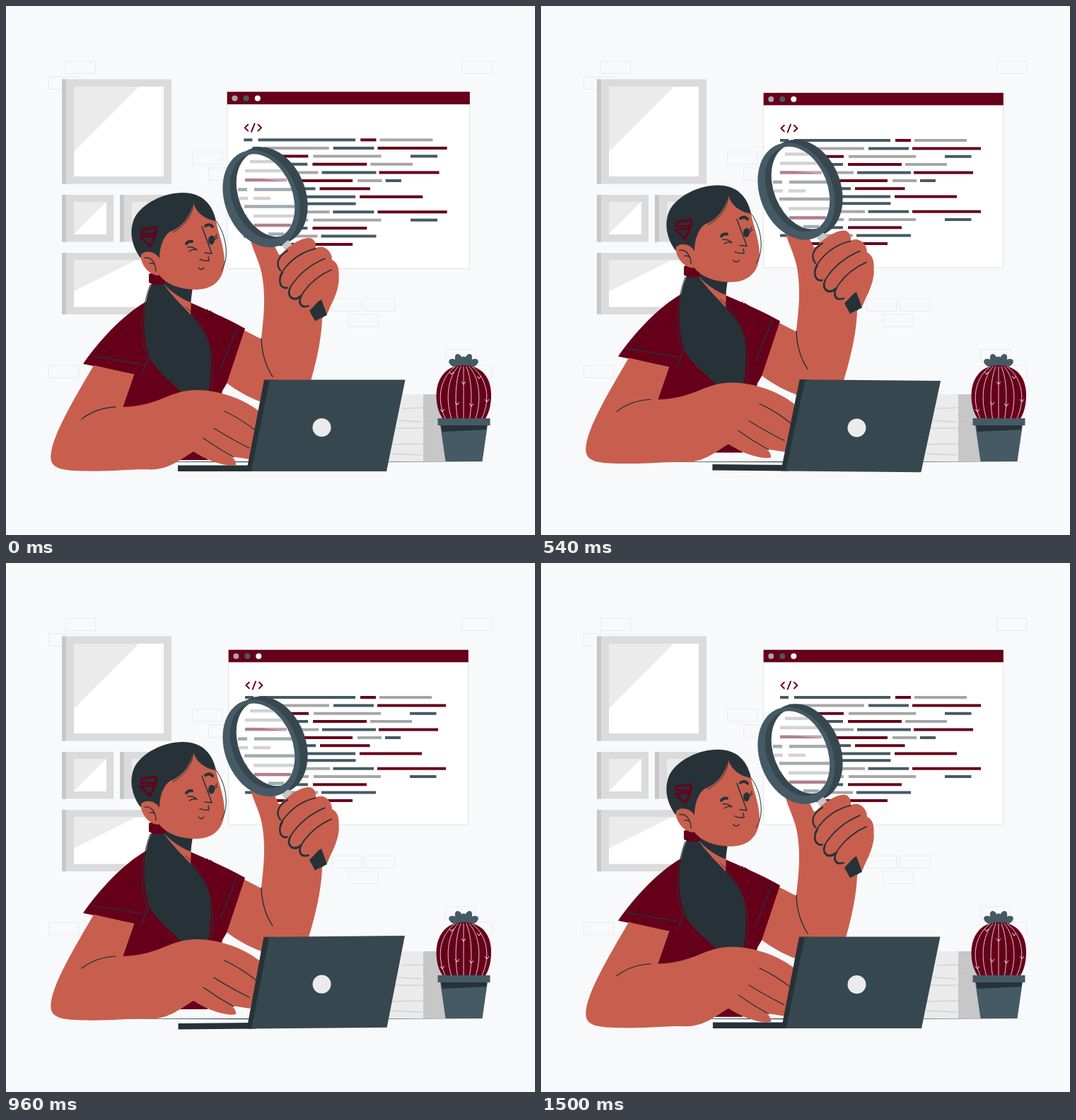
Write an HTML page with a canvas that moves like this. It is 748 by 748 pixels and loops after 1540 ms.

```html
<!DOCTYPE html>
<html lang="en">
<head>
<meta charset="utf-8">
<title>Code review</title>
<style>
html, body { margin: 0; width: 100%; height: 100%; overflow: hidden; background: #f8f9fb; }
canvas { display: block; width: 748px; height: 748px; }
</style>
</head>
<body>
<canvas id="stage" width="748" height="748"></canvas>
<script>
const ctx = document.getElementById('stage').getContext('2d');
const LOOP = 1540, FRAME = 1000 / 24, FRAMES = 37;
const BG = '#f8f9fb', INK = '#263238', SLATE = '#37474f', STEEL = '#455a64', MAROON = '#66001a',
      SKIN = '#c85f4e', GREY = '#a6a6a6', PALE = '#ebebeb', FRAMEGREY = '#dbdbdb', SHADE = '#c7c7c7';
const CODE = { d: STEEL, m: MAROON, g: GREY };

function fill(d, color) {
  ctx.fillStyle = color;
  ctx.fill(new Path2D(d));
}
function line(d, width = 1.4, color = INK) {
  ctx.strokeStyle = color;
  ctx.lineWidth = width;
  ctx.stroke(new Path2D(d));
}
function box(x1, y1, x2, y2, color) {
  ctx.fillStyle = color;
  ctx.fillRect(x1, y1, x2 - x1, y2 - y1);
}
function oval(x, y, rx, ry, color, angle = 0) {
  ctx.fillStyle = color;
  ctx.fill(ovalPath(x, y, rx, ry, angle));
}
function ovalPath(x, y, rx, ry, angle) {
  const p = new Path2D();
  p.ellipse(x, y, rx, ry, angle, 0, 7);
  return p;
}
function group(draw) {
  ctx.save();
  draw();
  ctx.restore();
}

// Straight-line interpolation through [time, value] pairs.
function track(keys, t) {
  const i = keys.findIndex(k => k[0] > t);
  const [t0, v0] = keys[i - 1], [t1, v1] = keys[i];
  return v0 + (v1 - v0) * (t - t0) / (t1 - t0);
}
const PULSE = [[0, 1.012], [133, 1.0985], [484, 1], [620, 1], [774, 1.1], [930, 1], [1600, 1]];
const FLOAT = [[0, 0], [760, -14.8], [1510, 0], [1600, 0]];
const TILT = [[0, 0], [380, 1], [1140, -1], [1510, 0], [1600, 0]];

function picture(x, y, x2, y2, glassW, glassH, right) {
  box(x, y, x2, y2, FRAMEGREY);
  box(x, y, x + 6, y2, SHADE);
  box(x + 17, y + 10.5, right, y2 - 10.5, '#fff');
  fill(`M${x + 17},${y + 10.5}h${glassW}l${-glassW},${glassH}z`, PALE);
}

function wall() {
  const bricks = [[84.5, 78], [61, 100], [645, 78], [264, 206.5], [287, 229], [461, 414],
                  [508, 414], [484.5, 436], [622, 486], [645, 508], [61, 508]];
  bricks.forEach(([x, y]) => line(`M${x},${y}h42v17.5h-42z`, 1, '#e9eaeb'));
  picture(79, 103.5, 234, 251.5, 92, 92, 223);
  picture(79, 267, 152, 333.5, 45, 45, 142);
  picture(161, 267, 234, 333.5, 45, 45, 224);
  picture(79, 349, 234, 436, 88, 44, 224);
}

const ROWS = [
  [190, 'd338-350 d358-494 m501-523 g528-602'],
  [201.5, 'd350-361 g366-457 d463-520 m525-622'],
  [212.8, 'm360-428 g435-530 d571-608.5'],
  [224, 'd360-427 m434-510 g515-574'],
  [235.6, 'g360-442 d447-523 m527-611'],
  [247, 'm350-490 g497-531 d536-558'],
  [258.2, 'd360-438 m444-514.5'],
  [269.5, 'd360-494 m500-588'],
  [279.2, 'd360-494.5'],
  [290.7, 'g360-458 d462.5-520 m525-622'],
  [302, 'g360-428 g435-530 d571-608.5'],
  [313.3, 'g338-350 d358-427 m434-510'],
  [324.5, 'd338-350 g358-441 d446-523'],
  [336, 'm360-490']
];
const LENS_ROWS = [
  [220, 'g345-378'], [233, 'g338-410'], [246, 'm338-397'], [259.5, 'd328-341 d351-408'],
  [272, 'g328-342 g350-374'], [283.5, 'd337-409'], [297, 'g328-341 g350-409'],
  [310, 'm351-403'], [322.5, 'd371-393']
];
function codeLines(rows, h) {
  for (const [y, spec] of rows) {
    for (const s of spec.split(' ')) {
      const [a, b] = s.slice(1).split('-').map(Number);
      box(a, y - h / 2, b, y + h / 2, CODE[s[0]]);
    }
  }
}

function codeWindow(scale) {
  group(() => {
    ctx.translate(484.25, 246.5);
    ctx.scale(scale, scale);
    ctx.translate(-484.25, -246.5);
    box(315, 123, 653.5, 370, '#fff');
    line('M315,123H653.5V370H315Z', 1, '#e3e3e3');
    box(314.7, 122.8, 653.8, 140.3, MAROON);
    [GREY, STEEL, '#fff'].forEach((c, i) => oval(325.3 + 16 * i, 131.8, 4, 4, c));
    line('M343.8,168.7L339.5,173L343.8,177.3M353,167.5L348.7,178.5M358,168.7L362.4,173L358,177.3', 2, MAROON);
    codeLines(ROWS, 4);
  });
}

function desk() {
  fill('M58,644.5L374,644L691,644.5L374,645.2Z', INK);
  box(540, 549, 590, 644, PALE);
  box(590, 549, 621, 644, SHADE);
  line('M560,569L590,568M555,586L587,588M550,597H590M545,620L590,619M545,633L588,635', 1, SHADE);
  line('M590,578Q594,581 598,581', 1, '#b8b8b8');
}

function cactus() {
  [[634, 505, -1.1], [640.5, 500, -0.4], [653.5, 500, 0.4], [660, 505, 1.1], [647, 504, 0]]
    .forEach(([x, y, a]) => oval(x, y, 5, 8.5, STEEL, a));
  fill('M647,508C621,508 608.5,528 608.5,551C608.5,569 614,580 621,588H674C682,580 686,566 686,550C686,526 673,508 647,508Z', MAROON);
  for (let k = -3; k <= 3; k++) {
    const x = 647 + k * 4, end = 647 + k * 8.5;
    line(`M${x},510C${x + k * 8},528 ${end + k * 4},560 ${end},584`, 0.9, '#eadfe1');
  }
  [[630, 520], [669, 526], [617, 573], [638, 563], [658, 565], [680, 559], [647, 534]]
    .forEach(([x, y]) => line(`M${x - 2.5},${y - 2.5}L${x},${y + 1}L${x + 2.5},${y - 2.5}`, 0.9, '#fff'));
  fill('M614,592H681L673.5,644H621.5Z', STEEL);
  fill('M615,592H680L679,599L617,602Z', INK);
  box(610.5, 583, 684.5, 593, STEEL);
}

function raisedArm() {
  fill('M345,328C350,350 362,365 364,395C367,425 363,448 361,471L330,455L312,533C325,543 342,553 360,559.5L375,585L418,570C436,520 446,475 447,442C460,425 470,405 471,385L404,345L386,352L375,330Z', SKIN);
  line('M361,470Q362,501 377,524');
}

function magnifier() {
  const tilt = -0.38;
  oval(372, 268, 51.5, 71, SLATE, tilt);
  oval(361, 272.5, 51.5, 71, STEEL, tilt);
  group(() => {
    ctx.clip(ovalPath(362.5, 269.5, 42.5, 62.5, tilt));
    box(300, 190, 430, 350, SLATE);
    ctx.clip(ovalPath(371.5, 266, 42.5, 62.5, tilt));
    box(300, 190, 430, 350, '#fff');
    ctx.globalAlpha = 0.5;
    codeLines(LENS_ROWS, 4.5);
    ctx.globalAlpha = 0.3;
    fill('M326,240L410,250V243L326,236Z', '#fff');
  });
}

function fist() {
  fill('M390,338L399,331L412,345L402,356Z', SHADE);
  fill('M429,431L446,413L454,437L437,445.5Z', INK);
  fill('M384,363C384,350 412,328 428,328C436,328 439,336 438,343C447,336 461,345 461,359C470,363 472,374 470,388C468,405 459,424 454,436L446,415L427,425C420,427 413,421 414,414C405,417 398,409 399,400C388,400 385,388 390,377C386,374 384,370 384,363Z', SKIN);
  line('M438,343C420,347 404,357 391,375C384,385 387,400 398,398', 1.8);
  line('M451,357C432,365 414,379 403,396C396,410 406,418 416,410', 1.8);
  line('M460,373C446,379 432,389 421,404C411,418 417,427 428,424', 1.8);
  line('M398,346C386,353 380,364 388,374M391,377C384,389 387,399 397,399M402,398C396,409 404,418 414,413M418,409C411,421 418,428 428,424', 2.3);
}

function shirt() {
  fill('M198,418C165,437 132,473 109,506L181,521L165,567V642H285L306,544L312,534L338,456C310,440 280,428 260,419Z', MAROON);
  [[172, 461], [208, 548], [273, 436], [128, 490], [305, 462]].forEach(([x, y]) =>
    line(`M${x + 4},${y - 4}l-5,5 6,4M${x + 12},${y - 7}l-3,14M${x + 15},${y - 5}l6,4 -5,6`, 1.2, '#54001a'));
  line('M122,495Q155,500 193,507M206,486L192,521M327,454L304,512');
  fill('M222,392L262,412L261,440L240,425Z', SKIN);
  fill('M222,388L264,398L261,419C248,414 234,405 222,392Z', INK);
}

function head() {
  fill('M206,392C193,420 192,465 203,497C215,520 235,532 247,545L286,546C290,525 292,500 287,478C278,445 245,425 222,392Z', INK);
  line('M204,394C191,428 188,475 201,500M254,425C285,453 300,498 290,544', 1);
  fill('M202,379C210,374 220,380 225,386V393C216,396 207,394 202,391Z', MAROON);
  fill('M190,356C178,340 173,318 182,299C192,280 222,264 250,264C278,264 292,281 297,304L270,330L218,358Z', INK);
  fill('M265,278C268,291 281,302 297,304C299,318 309,340 309,362C308,386 294,401 268,401C238,401 218,387 213,374L217,357C217,340 223,325 232,319C248,314 261,298 265,278Z', SKIN);
  fill('M217,357C211,346 195,345 191,352C189,363 201,381 216,381Z', SKIN);
  line('M196,356C207,354 212,366 212,375M203,364Q209,363 211,367', 1.4);
  line('M265,278C264,295 254,311 236,320M297,304C313,325 316,360 304,374', 1);
  line('M192,316L212,313V322L191,322ZM190,327L211,325L204,340Z', 3, MAROON);
  line('M255,336Q258,332 263,333M282,311Q288,307 292,312', 4);
  line('M257,341Q265,340 270,345Q264,343 259,347', 1.5);
  oval(290.5, 331, 4.5, 6.5, INK, 0.1);
  line('M293,327Q297,327 298,323M294,331L299,327', 1.3);
  line('M277,312L291,350L281,349M274,358Q280,361 287,360L286,354M272,370Q276,375 280,370', 1.5);
}

function nearArm() {
  fill('M124,508C100,550 70,598 64,630C60,652 72,657 110,657.5C150,658.5 180,654 205,655.5C232,655 248,640 265,630C285,643 310,652 325,649C326,644 322,640 319,637L345,641L375,590L358,573C335,555 300,543 270,543C230,543 220,565 165,567L181,521Z', SKIN);
  line('M107,584Q128,568 155,567M309,573Q333,584 355,602M294,597Q316,611 344,625M279,611Q300,626 322,638', 1.3);
}

function character(lift) {
  group(() => {
    ctx.translate(0, lift);
    raisedArm();
    magnifier();
    fist();
    shirt();
    head();
    nearArm();
  });
}

function laptop(degrees) {
  group(() => {
    ctx.translate(404, 593);
    ctx.rotate(degrees * Math.PI / 180);
    ctx.translate(-404, -593);
    box(243, 649.5, 348, 658, INK);
    fill('M365,528.5H380L352,658H340Z', INK);
    fill('M373,528.5H564.5L538,658H346.5Z', SLATE);
    oval(446.5, 596, 13, 13, PALE);
  });
}

function render(t) {
  box(0, 0, 748, 748, BG);
  wall();
  codeWindow(track(PULSE, t));
  desk();
  cactus();
  character(track(FLOAT, t));
  laptop(track(TILT, t));
}

ctx.lineCap = 'round';
ctx.lineJoin = 'round';
const start = performance.now();
function tick() {
  const t = (performance.now() - start) % LOOP;
  const step = Math.min(FRAMES - 1, Math.floor((t + 4) / FRAME));
  render(step * FRAME);
  requestAnimationFrame(tick);
}
tick();
</script>
</body>
</html>
```
